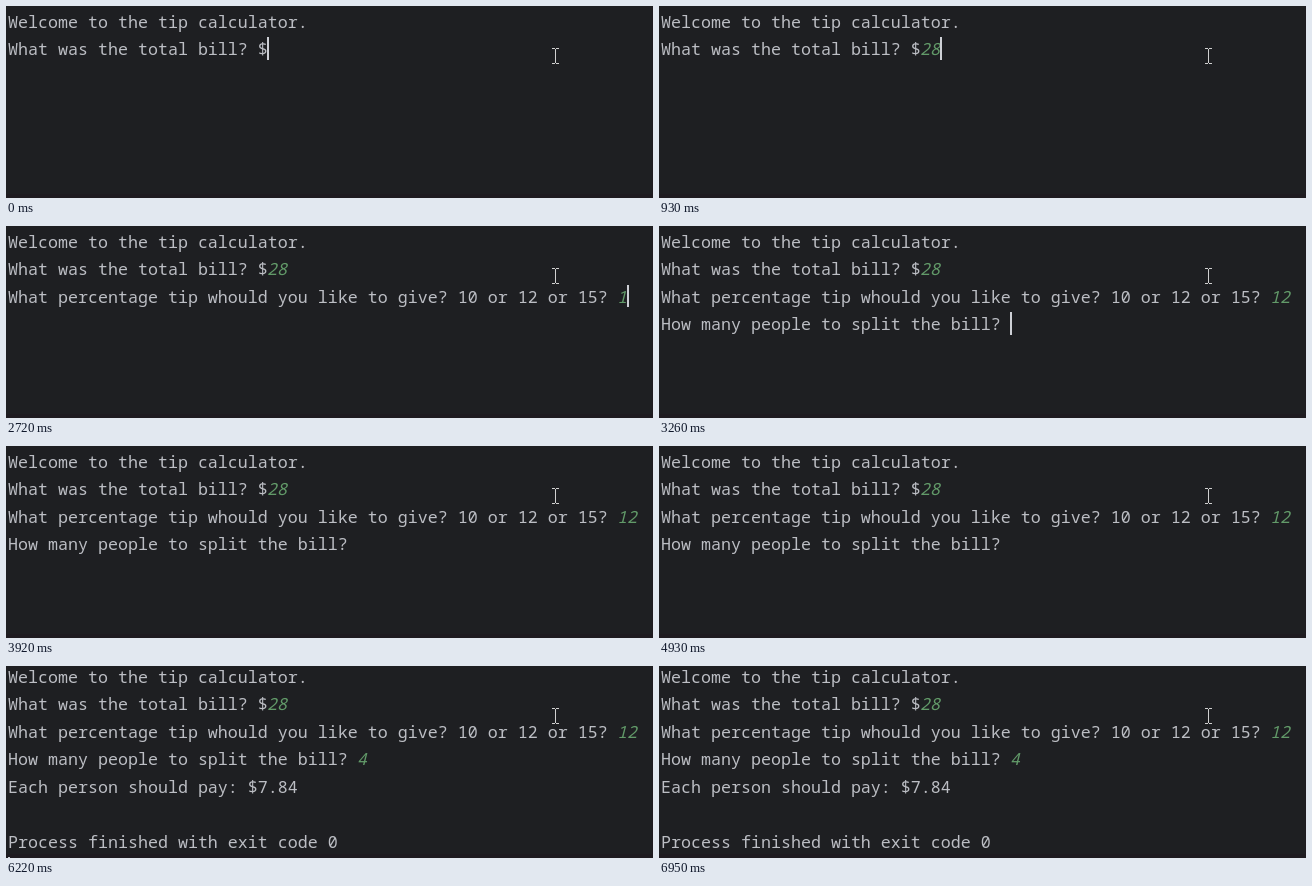
Recreate the animation shown at these times as an HTML page with a canvas. Size 647 px wide and 192 px high, loop 7.35 s.

```html
<!DOCTYPE html>
<html lang="en">
<head>
<meta charset="utf-8">
<title>Tip calculator</title>
<style>
html, body { margin: 0; width: 100%; height: 100%; overflow: hidden; background: #1e1f22; }
canvas { display: block; }
</style>
</head>
<body>
<canvas id="stage" width="647" height="192"></canvas>
<script>
const ctx = document.getElementById('stage').getContext('2d', { alpha: false });
const LOOP = 7350, PITCH = 10, ROW = 27.5;
const FONT = '16.667px "Noto Sans Mono", "DejaVu Sans Mono", monospace';
const TEXT = '#bcbec4', INPUT = '#629a69', BACK = '#1e1f22', EDGE = '#1e1b20';

// Each row: text, time it prints, and the times its answer keys are typed
const rows = [
  { text: 'Welcome to the tip calculator.', at: 0 },
  { text: 'What was the total bill? $', at: 0, answer: '28', keys: [260, 930] },
  { text: 'What percentage tip whould you like to give? 10 or 12 or 15? ', at: 1580, answer: '12', keys: [2720, 2790] },
  { text: 'How many people to split the bill? ', at: 3260, answer: '4', keys: [5810] },
  { text: 'Each person should pay: $7.84', at: 6220 },
  { text: '', at: 6220 },
  { text: 'Process finished with exit code 0', at: 6220 }
];
// Row holding the caret, from the given time on
const caretRows = [[0, 1], [1390, 2], [3260, 3], [5950, 4], [6220, 7]];
const caretOff = [[2460, 2720], [3920, 4450], [4930, 5460], [6950, LOOP]];

const rowY = (offset, i) => Math.floor(offset + i * ROW);
const typed = (row, t) => row.answer ? row.answer.slice(0, row.keys.filter(k => t >= k).length) : '';

function write(text, x, y, color, style) {
  ctx.font = style + FONT;
  ctx.fillStyle = color;
  ctx.fillText(text, x, y);
}

function drawCaret(t, scroll) {
  if (caretOff.some(([from, to]) => t >= from && t < to)) return;
  const index = caretRows.filter(([from]) => t >= from).pop()[1];
  const row = rows[index];
  const col = row && t >= row.at ? row.text.length + typed(row, t).length : 0;
  const top = rowY(4, index), bottom = rowY(26.5, index);
  ctx.fillStyle = '#ced0d6';
  ctx.fillRect(col ? 1 + col * PITCH : 2, top - scroll, 2, bottom - top);
}

function drawPointer() {
  ctx.fillStyle = '#d0d0d0';
  for (const y of [42, 57]) {
    ctx.fillRect(546, y, 3, 1);
    ctx.fillRect(550, y, 3, 1);
  }
  ctx.fillRect(549, 43, 1, 14);
}

function draw(t) {
  const scroll = t >= 6220 ? 5 : 0;
  ctx.fillStyle = BACK;
  ctx.fillRect(0, 0, 647, 192);
  ctx.fillStyle = EDGE;
  ctx.fillRect(0, 188, 647, 4);
  ctx.fillRect(646, 0, 1, 192);
  rows.forEach((row, i) => {
    if (t < row.at) return;
    const y = rowY(22, i) - scroll;
    write(row.text, 2, y, TEXT, '500 ');
    write(typed(row, t), 1 + row.text.length * PITCH, y, INPUT, 'italic ');
  });
  drawCaret(t, scroll);
  drawPointer();
}

const start = performance.now();
function tick() {
  draw((performance.now() - start) % LOOP);
  requestAnimationFrame(tick);
}
tick();
</script>
</body>
</html>
```
